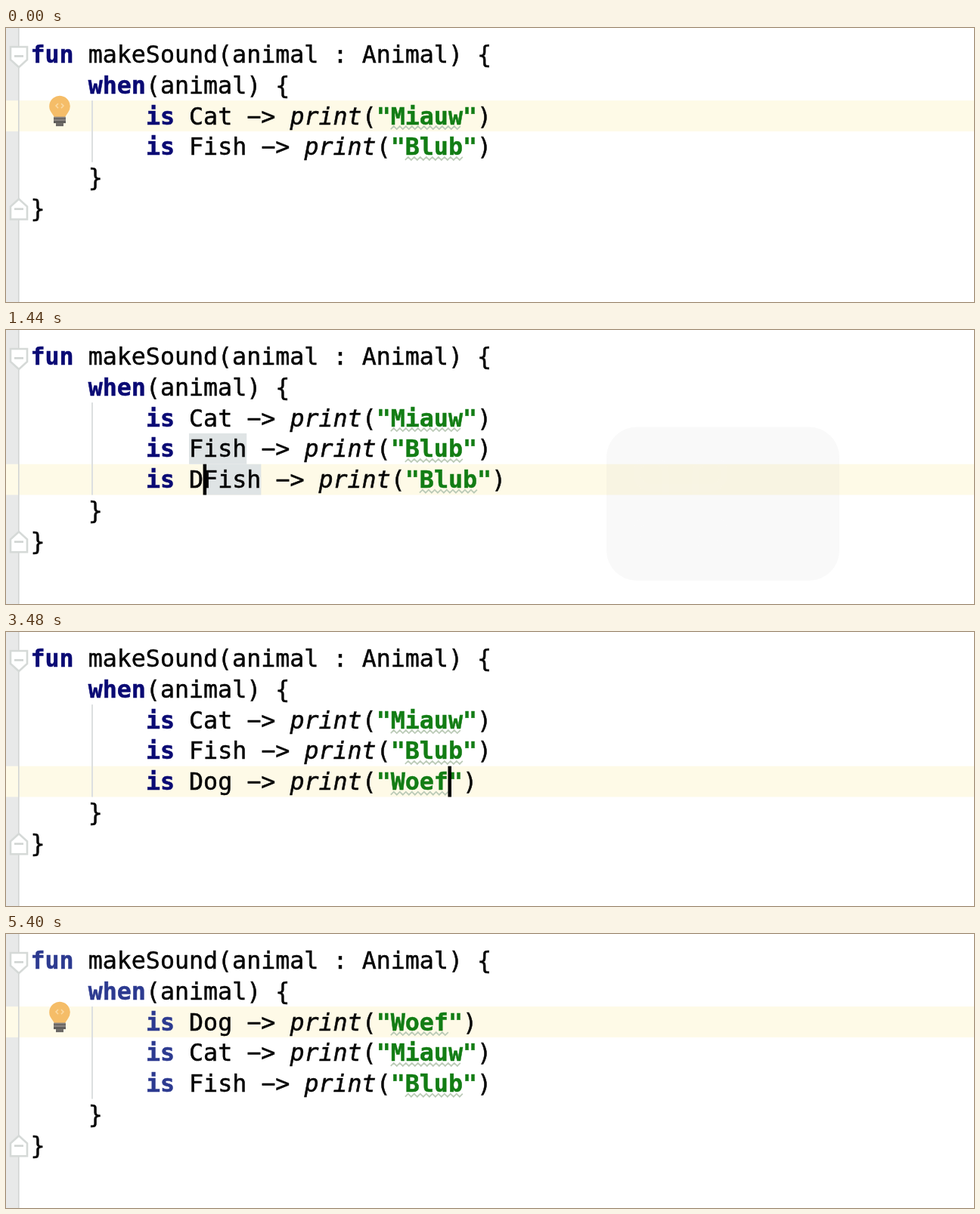
These frames come from a looping animation (1280x363 px, 5520 ms). An HTML page with a canvas:

```html
<!DOCTYPE html>
<html>
<head>
<meta charset="utf-8">
<style>
html, body { margin: 0; width: 100%; height: 100%; overflow: hidden; background: #fff; }
canvas { display: block; }
</style>
</head>
<body>
<canvas id="stage" width="1280" height="363"></canvas>
<script>
const g = document.getElementById('stage').getContext('2d');
const LOOP = 5520, STEP = 120;
const SIZE = 31.64, ADV = 19.05, LEFT = 32.5, PITCH = 40.8;
const BLUE = '#a9cbec', GRAY = '#dfe4e5';
const FONT = SIZE + 'px "DejaVu Sans Mono", monospace';

const colX = c => LEFT + c * ADV;
const rowY = r => 14.5 + r * PITCH;
const branch = (name, sound) => `        is ${name} −> print("${sound}")`;

const cat = branch('Cat', 'Miauw');
const fish = branch('Fish', 'Blub');
const dog = branch('Dog', 'Woef');
const withNew = (name, sound) => [cat, fish, branch(name, sound)];
const parens = row => [[row, 24, 25, BLUE], [row, 31, 32, BLUE]];

// Editor states: start time, branches, active row, caret column (null = hidden), marks
const states = [
  [0, [cat, fish], 2, null],
  [240, [cat, fish], 3, 32, parens(3)],
  [840, [cat, fish, fish], 4, 32, parens(4)],
  [1080, [cat, fish, fish], 4, 19],
  [1200, [cat, fish, fish], 4, 11, [[3, 11, 15, GRAY], [4, 11, 15, GRAY]]],
  [1440, withNew('DFish', 'Blub'), 4, 12, [[3, 11, 15, GRAY], [4, 12, 16, GRAY]]],
  [1560, withNew('DoFish', 'Blub'), 4, 13],
  [1680, withNew('DogFish', 'Blub'), 4, 14],
  [1920, withNew('Dog', 'Blub'), 4, 14],
  [2160, withNew('Dog', 'Blub'), 4, 25],
  [2520, withNew('Dog', 'Blub'), 4, 29, [[4, 25, 29, BLUE]]],
  [2760, withNew('Dog', 'W'), 4, 26],
  [2880, withNew('Dog', 'Wo'), 4, 27],
  [3000, withNew('Dog', 'Woe'), 4, 28],
  [3120, withNew('Dog', 'Woef'), 4, 29],
  [3840, [cat, dog, fish], 3, 29],
  [4560, [dog, cat, fish], 2, 29],
  [5160, [dog, cat, fish], 2, null]
];

function rect(x, y, w, h, color) {
  g.fillStyle = color;
  g.fillRect(x, y, w, h);
}

function path(points, closed) {
  g.beginPath();
  points.forEach(p => g.lineTo(...p));
  if (closed) g.closePath();
}

function squiggle(row, from, to) {
  const y = rowY(row) + 36, end = colX(to);
  g.beginPath();
  for (let x = colX(from), up = 0; x <= end; x += 4, up = !up) g.lineTo(x, y + (up ? -2 : 2));
  g.strokeStyle = '#bccbb8';
  g.lineWidth = 1.8;
  g.stroke();
}

function drawLine(text, row, colors) {
  for (const m of text.matchAll(/\b(?:fun|when|is)\b|print|"[^"]*"|(?:(?!\b(?:fun|when|is)\b|print|")[^ ])+/g)) {
    const word = m[0], quoted = word[0] === '"';
    const keyword = /^(fun|when|is)$/.test(word);
    const x = colX(m.index), y = rowY(row) + 31.5;
    if (quoted) squiggle(row, m.index + 1, m.index + word.length - 1);
    g.font = (quoted || keyword ? 'bold ' : word === 'print' ? 'italic ' : '') + FONT;
    g.fillStyle = g.strokeStyle = quoted ? colors.string : keyword ? colors.keyword : '#050505';
    g.fillText(word, x, y);
    // a hairline outline gives the strokes their slightly heavy weight
    g.lineWidth = 0.5;
    g.strokeText(word, x, y);
  }
}

function foldMark(y, dir) {
  path([[6, y - 13 * dir], [28, y - 13 * dir], [28, y + 4 * dir], [17, y + 14 * dir], [6, y + 4 * dir]], true);
  g.fillStyle = '#fff';
  g.fill();
  g.strokeStyle = '#d5d9d7';
  g.lineWidth = 2.6;
  g.stroke();
  rect(11, y - 2, 12, 2.6, '#d0d4d2');
}

function bulb(row) {
  const y = rowY(row) - 96;
  g.beginPath();
  g.arc(71, y + 103.5, 13.8, 0.8 * Math.PI, 0.2 * Math.PI);
  g.lineTo(78, y + 118);
  g.lineTo(64, y + 118);
  g.fillStyle = '#f5bd68';
  g.fill();
  g.strokeStyle = '#fbd9a0';
  g.lineWidth = 1.5;
  path([[69, y + 100], [66, y + 103], [69, y + 106]]);
  g.stroke();
  path([[73, y + 100], [76, y + 103], [73, y + 106]]);
  g.stroke();
  rect(63, y + 117.5, 16, 8, '#8b8682');
  rect(63, y + 119, 16, 2, '#6a6764');
  rect(63, y + 123, 16, 3, '#5e5c5a');
  rect(66, y + 126, 10, 4, '#6a6764');
}

function panel(width, alpha, drawKeys) {
  g.save();
  g.globalAlpha = alpha;
  g.beginPath();
  g.roundRect(794, 128.5, width, 203.5, 40);
  g.fillStyle = '#333132';
  g.fill();
  g.strokeStyle = g.fillStyle = '#fff';
  drawKeys();
  g.restore();
}

function duplicateKeys() {
  g.lineWidth = 10;
  g.strokeRect(872, 209, 40, 40);
  for (const sx of [-1, 1]) for (const sy of [-1, 1]) {
    const x = 892 + sx * 39, y = 229 + sy * 39;
    g.beginPath();
    g.moveTo(892 + sx * 20, 229 + sy * 20);
    g.lineTo(892 + sx * 20, y);
    g.arc(x, y, 19, sx > 0 ? Math.PI : 0, sy > 0 ? -Math.PI / 2 : Math.PI / 2, sx * sy > 0);
    g.closePath();
    g.stroke();
  }
  g.font = '140px "Open Sans", sans-serif';
  g.fillText('D', 978, 279);
}

function moveUpKeys() {
  g.lineWidth = 12;
  path([[836.5, 184.5], [878, 184.5], [921, 281], [961, 281]]);
  g.stroke();
  path([[908, 184.5], [961, 184.5]]);
  g.stroke();
  g.lineWidth = 10;
  path([[1045.5, 177], [1095.5, 226.5], [1071, 226.5], [1071, 281.5], [1019, 281.5], [1019, 226.5], [995.5, 226.5]], true);
  g.stroke();
  path([[1166, 169.5], [1198, 202], [1134, 202]], true);
  g.fill();
  for (const [y, h] of [[201, 12], [222, 15], [247, 14], [272, 15]]) rect(1159.5, y, 12.5, h, '#fff');
}

function draw(t) {
  const [, branches, row, caret, marks = []] = states.findLast(s => s[0] <= t);
  const during = (from, to) => t >= from && t < to;
  const tinted = during(480, 600);
  const colors = {
    keyword: t >= 5280 ? '#2c3a90' : '#0a0a74',
    string: during(2160, 2400) ? '#28562f' : '#127d14'
  };
  const last = 2 + branches.length;

  rect(0, 0, 1280, 363, tinted ? '#eafbf8' : '#fff');
  rect(0, 0, 17, 363, during(4320, 4560) ? '#e0eeed' : '#e8e9e9');
  rect(0, rowY(row), 1280, PITCH, '#fefae7');
  rect(16, 0, 1.6, 363, '#d2d5d4');
  rect(113, rowY(2), 2, PITCH * branches.length, '#dcdfe0');
  for (const [r, from, to, color] of marks) rect(colX(from), rowY(r), (to - from) * ADV, PITCH, color);

  const lines = ['fun makeSound(animal : Animal) {', '    when(animal) {', ...branches, '    }', '}'];
  lines.forEach((text, i) => drawLine(text, i, colors));
  foldMark(38, 1);
  foldMark(rowY(last + 1) + 22, -1);

  if (t < 240 || t >= 5040 || during(4320, 4560)) bulb(row);
  if (caret !== null) rect(colX(caret) - 0.5, rowY(row), 4.5, PITCH, '#000');

  const fade = end => Math.max(0, Math.min(1, (end - t) / 300));
  if (t >= 720) panel(308, fade(1448), duplicateKeys);
  if (t >= 3720) panel(450, fade(5060), moveUpKeys);
}

const start = performance.now();
function tick() {
  const t = (performance.now() - start) % LOOP;
  draw(Math.floor(t / STEP) * STEP);
  requestAnimationFrame(tick);
}
tick();
</script>
</body>
</html>
```
